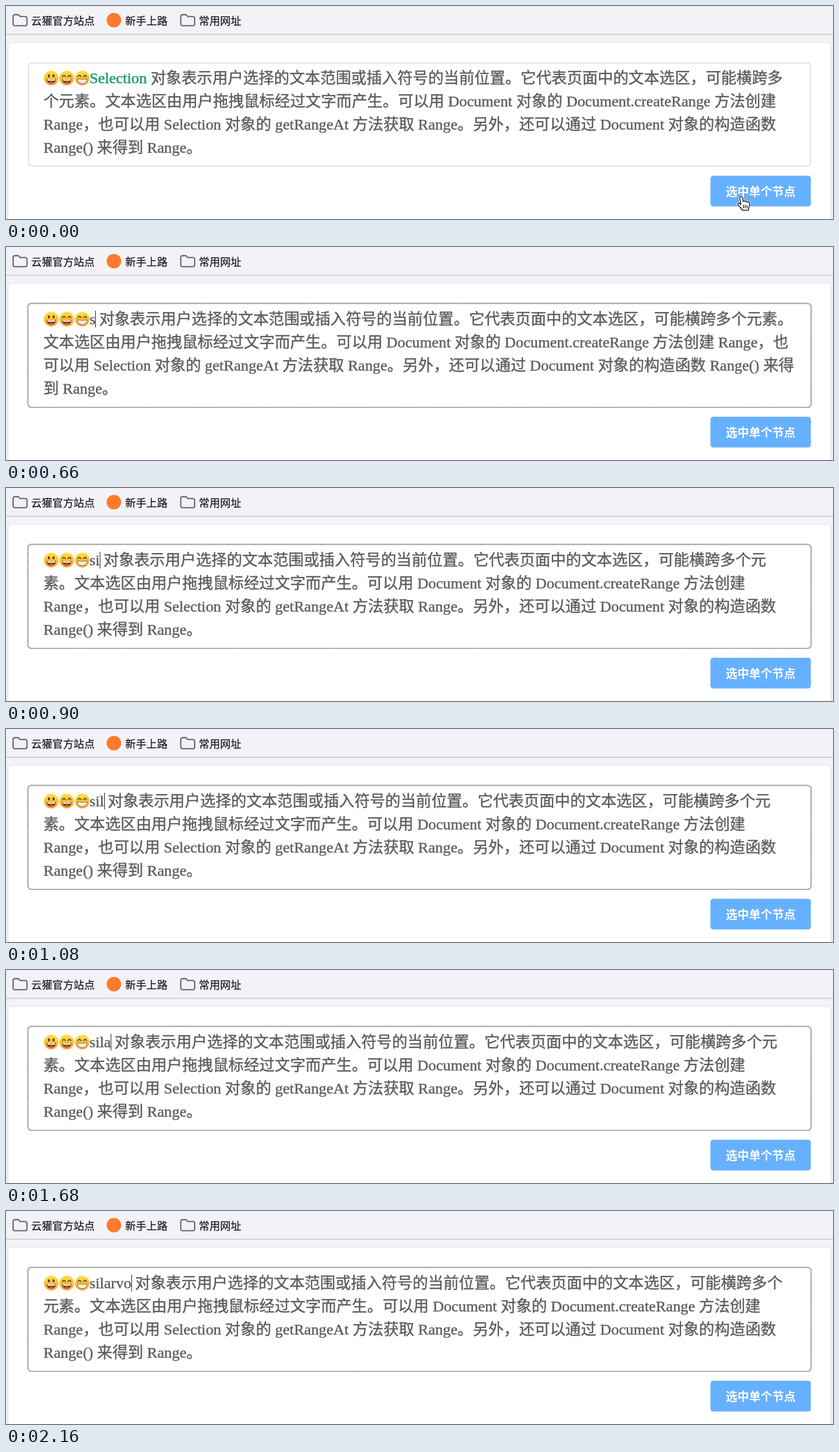
These frames come from a looping animation (1280x331 px, 2.22 s). An HTML page:

```html
<!DOCTYPE html>
<html lang="zh-CN">
<head>
<meta charset="utf-8">
<style>
html, body { margin: 0; width: 100%; height: 100%; overflow: hidden; background: #f4f4f7; }
svg { position: absolute; left: 0; top: 0; }
svg text { font-family: "Noto Sans CJK SC", sans-serif; }
p {
  position: absolute; left: 58px; top: 95.2px; width: 1164px; margin: 0;
  font: 23.87px/35.8px "Liberation Serif", "Noto Sans CJK SC", serif;
  color: #5b5c5f; -webkit-text-stroke: .4px;
  text-indent: 71.2px; text-spacing-trim: space-all;
}
.node { color: #0d9668; }
.selected { background: #b0d5f6; }
.caret { border-left: 1.3px solid #333; margin-right: -1.3px; }
</style>
</head>
<body>
<svg width="1280" height="331" viewBox="0 0 1280 331">
  <defs>
    <linearGradient id="skin" x2="0" y2="1">
      <stop stop-color="#ffe04c"/><stop offset="1" stop-color="#f2a32c"/>
    </linearGradient>
    <filter id="shadow" x="-5%" y="-5%" width="110%" height="110%">
      <feDropShadow dx="0" dy="1" stdDeviation="2.5" flood-opacity=".12"/>
    </filter>
    <path id="folder" d="M2.5 1h5.6l2.7 2.9h8.2a2.5 2.5 0 0 1 2.5 2.5v9.2a2.5 2.5 0 0 1-2.5 2.5H2.5A2.5 2.5 0 0 1 0 15.6V3.5A2.5 2.5 0 0 1 2.5 1z" fill="none" stroke="#5b5b62" stroke-width="1.8"/>
    <circle id="face" r="11.4" fill="url(#skin)"/>
    <path id="squint" d="M-6.6-2.2q2.3-4 4.6 0M2-2.2q2.3-4 4.6 0" fill="none" stroke="#623a12" stroke-width="1.5" stroke-linecap="round"/>
    <g id="laugh">
      <path d="M-7.2 1.2q7.2 2 14.4 0q-.7 7.6-7.2 7.6t-7.2-7.6z" fill="#6a3512"/>
      <path d="M-6.2 1.7q6.2 1.5 12.4 0l-.5 2q-5.7 1-11.4 0z" fill="#fff"/>
      <path d="M-4 7q4-3 8 0q-4 3-8 0z" fill="#e8503f"/>
    </g>
    <path id="palm" d="M4.6 4.4c-.2-3 3.8-3.4 4.3-.4l1.2 6.2c.4-1.8 3-1.6 3.3.2.5-1.5 2.9-1.2 3.2.6.6-1.2 2.8-.8 3.1 1.2.4 3 .2 5-1 7.2l-.6 4H8.7c-1.5-3-4.9-6.3-6.8-8.8-1.1-1.8 1.1-3.2 2.8-1.8l1.8 1.6z" fill="#fff"/>
  </defs>

  <rect width="1280" height="44" fill="#f3f3f7"/>
  <rect y="43.2" width="1280" height="1.4" fill="#c9c9cf"/>
  <use href="#folder" x="11" y="12.5"/>
  <circle cx="167" cy="22" r="11.2" fill="#ff7a2b"/>
  <use href="#folder" x="270.5" y="12.5"/>
  <g font-size="16.4" fill="#17171b" stroke="#17171b" stroke-width=".2">
    <text x="39" y="29">云獾官方站点</text>
    <text x="184.5" y="29">新手上路</text>
    <text x="298.5" y="29">常用网址</text>
  </g>

  <rect x="4" y="57.5" width="1272" height="300" rx="5" fill="#fff" filter="url(#shadow)"/>
  <rect x="34.8" y="88.5" width="1210.4" height="160" rx="5" fill="#fff" stroke="#d9dadd" stroke-width="1.5"/>
  <rect id="ring" x="33.6" y="87.3" width="1212.8" height="162.2" rx="6" fill="none" stroke="#333" stroke-width="1.2" stroke-dasharray="1.2"/>

  <g transform="translate(70 112)">
    <use href="#face"/>
    <ellipse cx="-3.6" cy="-3.6" rx="1.6" ry="2.5" fill="#623a12"/>
    <ellipse cx="3.6" cy="-3.6" rx="1.6" ry="2.5" fill="#623a12"/>
    <use href="#laugh"/>
  </g>
  <g transform="translate(94 112)">
    <use href="#face"/><use href="#squint"/><use href="#laugh"/>
  </g>
  <g transform="translate(118 112)">
    <use href="#face"/><use href="#squint"/>
    <path d="M-7.6 1.4q7.6 1.4 15.2 0q-.6 7-7.6 7t-7.6-7z" fill="#fff" stroke="#8a5a25" stroke-width=".9"/>
    <path d="M-6.4 4.6q6.4 1 12.8 0" fill="none" stroke="#b9b0a4" stroke-width=".6"/>
  </g>

  <rect x="1090.3" y="263.8" width="155.5" height="47.8" rx="4.5" fill="#66b1ff"/>
  <text x="1114" y="294.6" font-size="18" font-weight="700" fill="#fff">选中单个节点</text>
  <g id="hand" transform="translate(1131 294)" stroke-linejoin="round" stroke-linecap="round">
    <use href="#palm" stroke="#fff" stroke-width="3"/>
    <use href="#palm" stroke="#111" stroke-width="1.3"/>
    <path d="M10.6 15.500v4.500m2.700-4.500v4.500m2.700-4.500v4.500" stroke="#111" stroke-width="1.1"/>
  </g>
</svg>

<p><span id="word"></span><span id="caret" class="caret"></span> 对象表示用户选择的文本范围或插入符号的当前位置。它代表页面中的文本选区，可能横跨多个元素。文本选区由用户拖拽鼠标经过文字而产生。可以用 Document 对象的 Document.createRange 方法创建 Range，也可以用 Selection 对象的 getRangeAt 方法获取 Range。另外，还可以通过 Document 对象的构造函数 Range() 来得到 Range。</p>

<script>
const LOOP = 2220, SELECT_AT = 180;
const TYPED = 'silarvo', KEY_TIMES = [540, 840, 960, 1140, 1740, 1800, 1920];
const [word, caret, ring, hand] = ['word', 'caret', 'ring', 'hand'].map(id => document.getElementById(id));
const show = (el, on) => { el.style.display = on ? '' : 'none'; };

function draw() {
  const t = performance.now() % LOOP;
  const typed = KEY_TIMES.filter(k => k <= t).length;
  const focused = t >= SELECT_AT;
  word.textContent = typed ? TYPED.slice(0, typed) : 'Selection';
  word.className = typed ? '' : focused ? 'node selected' : 'node';
  show(caret, typed);
  show(ring, focused);
  show(hand, !typed);
  requestAnimationFrame(draw);
}
draw();
</script>
</body>
</html>
```
